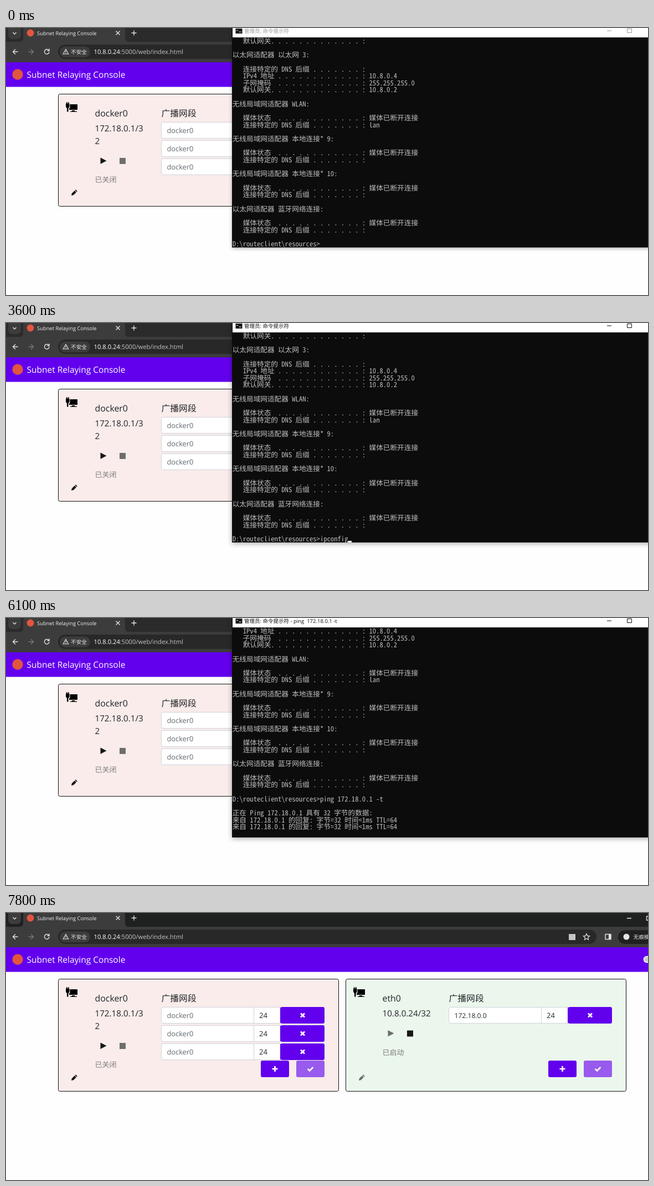
Animation of 1159x483 px, one loop 8 s. Source, as an HTML page:

```html
<!DOCTYPE html>
<html lang="zh-CN">
<head>
<meta charset="utf-8">
<title>Subnet Relaying Console</title>
<style>
html, body { margin: 0; width: 100%; height: 100%; overflow: hidden; background: #fefefe; }
svg { display: block; width: 1159px; height: 483px; }
text { white-space: pre; text-rendering: geometricPrecision; font-family: "Open Sans", "Noto Sans CJK SC", sans-serif; }
.title { font-weight: 500; }
.line { fill: none; stroke: #e3e3e3; stroke-width: 1.4; }
/* Half-width Latin keeps the console grid: two letters per ideograph. */
#rows text {
  font: 12.66px "Noto Sans Mono CJK SC", "Noto Sans CJK SC", monospace;
  font-feature-settings: "hwid"; font-kerning: none; fill: #bebebe;
}
#frame { filter: drop-shadow(0 2px 3px rgba(0, 0, 0, .3)); }
.active #frame { filter: drop-shadow(0 2px 5px rgba(0, 0, 0, .35)); }
#bar { fill: #999; stroke: #999; }
.active #bar { fill: #111; stroke: #111; }
</style>
</head>
<body>
<svg viewBox="0 0 1159 483">
  <defs><clipPath id="screen"><rect x="408" y="17" width="751" height="380"/></clipPath></defs>

  <!-- browser -->
  <rect id="strip" width="1159" height="26"/>
  <rect y="25" width="1159" height="37" fill="#3c3c3c"/>
  <rect x="4" y="-4" width="23" height="24" rx="7" fill="#3c3c3c"/>
  <path d="M24 25.5Q31 25 31 18V4Q31-3 38-3H208Q215-3 215 4V18Q215 25 222 25.5Z" fill="#3c3c3c"/>
  <circle cx="44" cy="9" r="6.5" fill="#e2553f"/>
  <text class="title" x="56" y="12.8" font-size="9.4" fill="#f0f0f0">Subnet Relaying Console</text>
  <path class="line" d="M12.5 8l3 3 3-3M198.5 5.5l7 7m0-7l-7 7M226.5 9h9M231 4.5v9M1121 9.5h8M1156.5 6h4v7h-4z"/>
  <path class="line" d="M21.5 43h-9m4.5-4.5l-4.5 4.5 4.5 4.5M77 40a4.3 4.3 0 1 0 1 3M78 37.5v3.5h-3.5"/>
  <path class="line" d="M40.5 43h9m-4.5-4.5l4.5 4.5-4.5 4.5" style="stroke:#777"/>
  <rect x="94" y="30" width="972" height="26" rx="13" fill="#282828"/>
  <rect x="97" y="33.5" width="55" height="19.5" rx="9.7" fill="#3c3c3c"/>
  <path class="line" d="M108 38.5l4.7 8.5h-9.4zM108 41.5v2.5m0 1v1" style="stroke-width:1.1"/>
  <text x="117" y="46.8" font-size="9.7" fill="#e8e8e8">不安全</text>
  <text x="158.5" y="47" font-size="11.2" fill="#c4c4c4"><tspan fill="#fff">10.8.0.24</tspan>:5000/web/index.html</text>
  <rect x="1016" y="38" width="12" height="11" fill="#c4c4c4"/>
  <path class="line" d="M1048 37.5l1.6 3.7 4 .4-3 2.7.9 4-3.5-2.1-3.5 2.1.9-4-3-2.7 4-.4z" style="stroke-width:1.2"/>
  <path class="line" d="M1082 38.5h10v9h-10z"/><path d="M1088 38.5h4v9h-4z" fill="#e3e3e3"/>
  <rect x="1105" y="31" width="80" height="25" rx="12.5" fill="#202020"/>
  <circle cx="1120" cy="43" r="5.5" fill="#e3e3e3"/>
  <text x="1132.5" y="46.8" font-size="9.7" fill="#e8e8e8">无痕模式</text>

  <!-- page -->
  <rect y="62" width="1159" height="44.5" fill="#6200ee"/>
  <circle cx="21" cy="84" r="9.7" fill="#e2553f"/>
  <text class="title" x="37.5" y="89.8" font-size="15.5" fill="#fff">Subnet Relaying Console</text>
  <circle cx="1157" cy="84" r="5.5" fill="#ccc" stroke="#fff" stroke-width="1.5"/>
  <g id="cards"></g>

  <!-- terminal -->
  <g id="term">
    <rect id="frame" x="408" y="-8" width="760" height="405" fill="#0c0c0c"/>
    <rect x="409" width="750" height="17" fill="#fff"/>
    <g id="bar">
      <rect x="414.5" y="1" width="12" height="9" fill="#111" stroke="#888" stroke-width=".6"/>
      <path d="M416 4.5h3M420.5 7h4" stroke="#fff"/>
      <text id="title" x="430" y="9.2" font-size="9.5" stroke="none"></text>
      <path d="M1085 5h8M1121.5 1.5h8v7h-8z" fill="none"/>
    </g>
    <g id="rows" clip-path="url(#screen)"></g>
    <rect id="cursor" y="394" width="6.3" height="3" fill="#fff"/>
  </g>
</svg>
<script>
const $ = id => document.getElementById(id);
const LOOP = 8000, CELL = 6.33, LEFT = 408.7, ROWS = 30;

// Cards
const text = (x, y, size, fill, s) => `<text x="${x}" y="${y}" font-size="${size}" fill="${fill}">${s}</text>`;
const button = (x, y, w, icon, fill = '#6200ee') =>
  `<rect x="${x}" y="${y}" width="${w}" height="30" rx="3" fill="${fill}"/>
   <path transform="translate(${x + w / 2} ${y + 15})" d="${icon}" fill="none" stroke="#fff" stroke-width="2.7"/>`;

const segment = (y, s, size, fill) =>
  `<rect x="280.5" y="${y + .5}" width="220" height="29" rx="3" fill="#fff" stroke="#ced4da"/>
   <path d="M447.5 ${y}v30" stroke="#ced4da"/>
   ${text(290.5, y + 19.7, size, fill, s)}${text(457, y + 19.7, 13, '#212529', '24')}
   ${button(496, y, 79, 'M-3.5-3.5l7 7m0-7l-7 7')}<rect x="495" y="${y + 1}" width="4" height="28" fill="#6200ee"/>`;

function card(c) {
  const ink = '#161616', dim = '#6e6e6e';
  return `<g transform="translate(${c.x})">
    <rect x="94.5" y="119.5" width="506" height="203" rx="3" fill="${c.bg}" stroke="#111"/>
    <path d="M108 136.5h1v-2.5h1.5v2.5h1.5v-2.5h1.5v2.5h1v6l-2 3v6h-2.5v-6l-2-3z"/>
    <path d="M115.5 138h13.5v10h-15v-2l1.5-2zM119 149h5v1.5h4v1.2h-12v-1.2h3z"/>
    ${text(160.5, 160.3, 15.9, '#212529', c.name)}
    ${c.ip.map((s, i) => text(160.5, 186.7 + 22.8 * i, 15.2, '#212529', s)).join('')}
    <g transform="translate(0 ${c.shift})">
      <path d="M170.5 234.5l11 5.7-11 5.7z" fill="${c.on ? dim : ink}"/>
      <rect x="205" y="235" width="11" height="11" fill="${c.on ? ink : dim}"/>
      ${text(160.5, 279, 13, '#7c7c7c', c.status)}
    </g>
    <path d="M118 303l.8-3.8 5-5 3 3-5 5zM124.5 293.5l1.3-1.3 3 3-1.3 1.3z" fill="${c.on ? dim : ink}"/>
    ${text(280.5, 160.3, 15.8, '#212529', '广播网段')}
    ${c.nets.map((s, i) => segment(170 + 33 * i, s, c.on ? 12.1 : 12.8, c.on ? '#212529' : '#626970')).join('')}
    ${button(460, 267, 51, 'M-5 0h10M0-5v10')}
    ${button(524, 267, 51, 'M-4.8 0l3.4 3.4 6.2-6.4', '#985bed')}
  </g>`;
}

$('cards').innerHTML = [
  { x: 0, bg: '#f9ecea', name: 'docker0', ip: ['172.18.0.1/3', '2'], shift: 0, status: '已关闭', nets: Array(3).fill('docker0') },
  { x: 519, bg: '#ebf7ec', name: 'eth0', ip: ['10.8.0.24/32'], shift: -22.5, status: '已启动', nets: ['172.18.0.0'], on: true }
].map(card).join('');

// Terminal
const field = (label, dots, value = '') => '   ' + label + '. '.repeat(dots) + ': ' + value;
const suffix = value => field('连接特定的 DNS 后缀 ', 7, value);
const offline = (name, value) => [name + ':', '', field('媒体状态  ', 12, '媒体已断开连接'), suffix(value), ''];
const config = [
  field('默认网关', 13), '',
  '以太网适配器 以太网 3:', '',
  suffix(), field('IPv4 地址 ', 12, '10.8.0.4'), field('子网掩码  ', 12, '255.255.255.0'), field('默认网关', 13, '10.8.0.2'), '',
  ...offline('无线局域网适配器 WLAN', 'lan'),
  ...offline('无线局域网适配器 本地连接* 9'),
  ...offline('无线局域网适配器 本地连接* 10'),
  ...offline('以太网适配器 蓝牙网络连接')
];
const prompt = 'D:\\routeclient\\resources>';
const replyTimes = [5200, 6100, 7000];
const reply = '来自 172.18.0.1 的回复: 字节=32 时间<1ms TTL=64';

let shown;
function drawRows(command, replies) {
  const key = command + replies;
  if (key === shown) return;
  shown = key;
  const lines = [...config, prompt + command];
  if (replies) lines.push('', '正在 Ping 172.18.0.1 具有 32 字节的数据:', ...Array(replies).fill(reply), '');
  $('rows').innerHTML = lines.slice(-ROWS).map((s, i) =>
    `<text x="${LEFT}" y="${395 - 12.66 * (ROWS - 1 - i)}">${s.replace('<', '&lt;')}</text>`).join('');
  $('cursor').setAttribute('x', LEFT + CELL * lines.at(-1).length);
  $('title').textContent = '管理员: 命令提示符' + (replies ? ' - ping  172.18.0.1 -t' : '');
}

function draw() {
  const t = performance.now() % LOOP;
  const closed = t >= 7800;
  const command = t < 3600 ? '' : t < 3900 ? 'ipconfig' : 'ping 172.18.0.1 -t';
  const blink = t < 1700 || replyTimes.slice(1).some(s => t >= s && t < s + 100);
  drawRows(command, replyTimes.filter(s => t >= s).length);
  $('term').setAttribute('class', t < 1300 ? '' : 'active');
  $('term').style.display = closed ? 'none' : '';
  $('cursor').style.display = blink ? 'none' : '';
  $('strip').setAttribute('fill', closed ? '#1f2020' : '#2b2b2b');
  requestAnimationFrame(draw);
}
draw();
</script>
</body>
</html>
```
